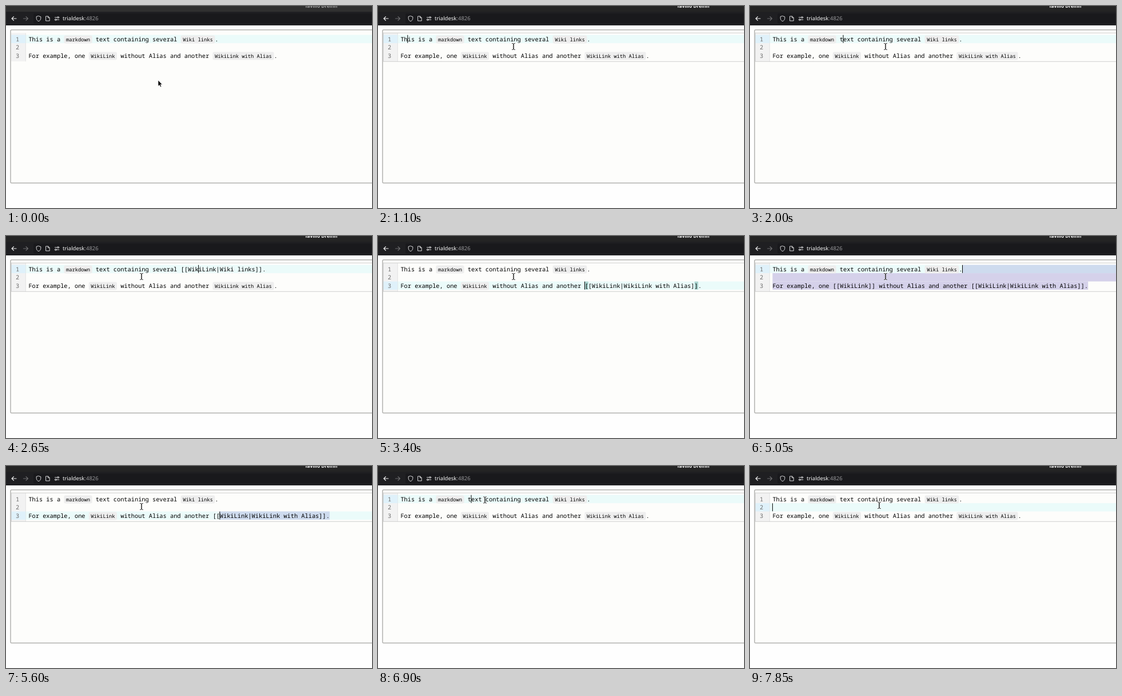
Write an HTML page that moves like this. It is 640 px wide and 354 px high and loops after 8000 ms.

```html
<!DOCTYPE html>
<html lang="en">
<head>
<meta charset="utf-8">
<title>Wiki link editor</title>
<style>
  html, body { margin: 0; width: 100%; height: 100%; overflow: hidden; background: #fefefe; }
  svg { display: block; width: 640px; height: 354px; }
  text { white-space: pre; text-rendering: geometricPrecision; }
  .mono { font-family: "Noto Sans Mono", "DejaVu Sans Mono", monospace; font-size: 10.335px; }
  .chip { font-size: 8.77px; }
  .ui { font-family: "Noto Sans", "Open Sans", sans-serif; font-size: 9.5px; }
  .title { font-size: 8.3px; font-weight: 700; }
</style>
</head>
<body>
<svg viewBox="0 0 640 354" xmlns="http://www.w3.org/2000/svg">
  <rect id="titleBar" width="640" height="11"/>
  <text id="title" class="ui title" x="551" y="2.6" text-anchor="middle">Tavillo Drelfin</text>
  <rect y="10" width="640" height="24" fill="#1f1f22"/>
  <rect x="48" y="13" width="610" height="18" rx="3" fill="#19191c"/>
  <g fill="none" stroke="#f2f2f2" stroke-width="1.2" stroke-linecap="round" stroke-linejoin="round">
    <path d="M18 22H10.3M13.5 18.6L10.1 22L13.5 25.4"/>
    <path d="M30.5 22H38.2M35 18.6L38.4 22L35 25.4" stroke="#6c6c6f"/>
    <g stroke="#d8d8da" stroke-width="1">
      <path d="M57 17.6L60.8 18.9V21.5C60.8 24 59.3 25.8 57 26.7C54.7 25.8 53.2 24 53.2 21.5V18.9Z"/>
      <path d="M70 18H73.7L76.2 20.5V26H70ZM73.5 18.2V20.7H76"/>
      <path d="M85.5 20H89.5M92.4 20H93M88.5 24H92.8M85.2 24H85.6"/>
      <circle cx="91" cy="20" r="1.3"/><circle cx="87" cy="24" r="1.3"/>
    </g>
  </g>
  <text class="ui" x="99" y="25.4" fill="#f6f6f6">trialdesk<tspan fill="#98989b">:4826</tspan></text>
  <rect x="8" y="41.7" width="660" height="268.6" rx="2" fill="#fdfdfb" stroke="#b2b2b0" stroke-width="1.5"/>
  <rect x="9" y="47.4" width="25" height="49.8" fill="#f2f2f2"/>
  <path d="M34.3 47.4V97.2" stroke="#dedede" stroke-width=".8"/>
  <g id="editor"></g>
  <path id="outline" d="M640 47.2H9.2V97.3H640" fill="none" stroke="#c4c4c4" stroke-width=".8"/>
  <path id="arrow" d="M0 0V10.6L2.4 8.4L4 12L5.8 11.2L4.2 7.7H7.3Z" fill="#000" stroke="#fff" stroke-width=".7"/>
  <g id="beam" fill="none" stroke-linecap="round">
    <path d="M-2.4 -5.6Q0 -5.6 0 -4V4Q0 5.6 -2.4 5.6M2.4 -5.6Q0 -5.6 0 -4V4Q0 5.6 2.4 5.6" stroke="#fff" stroke-opacity=".7" stroke-width="2.2"/>
    <path d="M-2.4 -5.6Q0 -5.6 0 -4V4Q0 5.6 -2.4 5.6M2.4 -5.6Q0 -5.6 0 -4V4Q0 5.6 2.4 5.6" stroke="#222" stroke-width="1"/>
  </g>
</svg>
<script>
const LOOP = 8000, TICK = 50, FOCUS_AT = 550, BLINK = 300;
const LEFT = 39.4, TOP = 50.6, ROW = 14.5, CHAR = 6.2, CHIP_CHAR = 5.262, CHIP_PAD = 3.55;
const $ = id => document.getElementById(id);

const lines = [
  'This is a [[markdown]] text containing several [[WikiLink|Wiki links]].',
  '',
  'For example, one [[WikiLink]] without Alias and another [[WikiLink|WikiLink with Alias]].'
].map(source => {
  const parts = [];
  let col = 0;
  for (const text of source.split(/(\[\[.*?\]\])/)) {
    if (!text) continue;
    const label = text.startsWith('[[') ? text.slice(2, -2).split('|').pop() : null;
    parts.push({ text, label, from: col, to: col += text.length });
  }
  return { parts, length: col };
});
const DOC_END = { line: 2, col: lines[2].length };

// Caret positions over time; walk() repeats a key from one column to another.
const caretMoves = [];
const move = (time, line, col) => caretMoves.push({ time, line, col });
function walk(start, end, line, from, to) {
  for (let t = start; t <= end; t += TICK)
    move(t, line, Math.round(from + (to - from) * (t - start) / (end - start)));
}
move(0, 0, 0);
move(FOCUS_AT, 1, 0);
move(750, 0, 0);
move(950, 0, 1);
move(1100, 0, 2);
walk(1250, 1600, 0, 3, 10);
walk(1850, 2000, 0, 11, 24);
walk(2050, 2400, 0, 27, 51);
move(2650, 0, 52);
walk(2900, 3050, 0, 53, 56);
move(3150, 1, 0);
move(3400, 2, 56);
move(3500, 1, 0);
move(3600, 0, 70);
move(3700, 0, 0);
move(4200, 1, 0);
move(4400, 2, 0);
move(4450, 2, 88);
move(4500, 2, 89);
move(4950, 1, 0);
move(5050, 0, 71);
walk(5150, 5200, 0, 70, 69);
walk(5350, 5450, 0, 66, 58);
move(5500, 1, 0);
move(5600, 2, 58);
move(6450, 0, 22);
move(6900, 0, 24);
move(7450, 2, 29);
move(7850, 1, 0);

const SELECT_FROM = 4950, SELECT_TO = 6450;

const pointerPath = [
  [50, 266, 130], [500, 237, 71], [5600, 237, 71], [6250, 137, 63], [6550, 137, 63],
  [6850, 187, 59.5], [7000, 187, 59.5], [7250, 175, 87.5], [7450, 175, 87.5], [7800, 226, 69], [LOOP, 226, 69]
];
function pointerAt(t) {
  const i = pointerPath.findIndex(p => p[0] > t);
  if (i === 0) return pointerPath[0].slice(1);
  const [t0, x0, y0] = pointerPath[i - 1], [t1, x1, y1] = pointerPath[i];
  const u = (t - t0) / (t1 - t0), k = u * u * (3 - 2 * u);
  return [x0 + (x1 - x0) * k, y0 + (y1 - y0) * k];
}

const rowTop = line => TOP + line * ROW;
const rect = (x, y, w, h, fill, rx = 0) =>
  `<rect x="${x}" y="${y}" width="${w}" height="${h}" rx="${rx}" fill="${fill}"/>`;
const label = (x, line, text, cls = '', extra = '') =>
  `<text class="mono ${cls}" x="${x}" y="${rowTop(line) + 11.3}" ${extra}>${text}</text>`;
const before = (a, b) => a.line < b.line || (a.line === b.line && a.col <= b.col);

function layout(from, to) {
  return lines.map(({ parts }, line) => {
    let x = LEFT;
    return parts.map(part => {
      const touched = before(from, { line, col: part.to }) && before({ line, col: part.from }, to);
      const chip = part.label && !touched;
      const width = chip ? part.label.length * CHIP_CHAR + 2 * CHIP_PAD : part.text.length * CHAR;
      const placed = { ...part, chip, x, width };
      x += width;
      return placed;
    });
  });
}

function columnX(parts, col) {
  const part = parts.find(p => col <= p.to);
  if (!part) return LEFT;
  return col === part.to ? part.x + part.width : part.x + (col - part.from) * CHAR;
}

function matchedBrackets(parts, col) {
  for (const i of [col - 1, col]) {
    const link = parts.find(p => p.label && !p.chip && i >= p.from && i < p.to);
    if (!link) continue;
    const inset = Math.min(i - link.from, link.to - 1 - i);
    if (inset < 2) return [link.from + inset, link.to - 1 - inset];
  }
  return [];
}

function editorMarkup(t) {
  const focused = t >= FOCUS_AT;
  const head = caretMoves.filter(m => m.time <= t).pop();
  const selecting = t >= SELECT_FROM && t < SELECT_TO;
  const tail = selecting ? DOC_END : head;
  // Without focus no link is under the caret.
  const placed = layout(head, tail);
  const caretX = columnX(placed[head.line], head.col);
  let out = '';

  if (selecting) {
    for (let line = head.line; line <= tail.line; line++) {
      const x0 = line === head.line ? caretX : LEFT;
      const x1 = line === tail.line ? columnX(placed[line], tail.col) : 640;
      out += rect(x0, rowTop(line), x1 - x0, ROW, '#d5d1ea');
    }
  }

  out += rect(9, rowTop(head.line), 25, ROW, '#dff1fa');
  out += rect(34.5, rowTop(head.line), 606, ROW, 'rgba(184,244,246,.27)');

  if (!selecting && focused) {
    for (const col of matchedBrackets(placed[head.line], head.col))
      out += rect(columnX(placed[head.line], col), rowTop(head.line) + .2, CHAR, 14, 'rgba(50,140,130,.36)');
  }

  placed.forEach((parts, line) => {
    out += label(20, line, line + 1, '', 'fill="#6c6c6c" text-anchor="middle"');
    for (const p of parts) {
      if (p.chip) {
        out += rect(p.x, rowTop(line) + .8, p.width, 14, '#eeeeee', 2.5);
        out += label(p.x + CHIP_PAD, line, p.label, 'chip');
      } else {
        out += label(p.x, line, p.text);
      }
    }
  });

  if (focused && Math.floor((t - head.time) / BLINK) % 2 === 0)
    out += rect(caretX - .5, rowTop(head.line) + .2, 1, 14, '#000');
  return out;
}

function render(t) {
  const focused = t >= FOCUS_AT;
  $('titleBar').setAttribute('fill', focused ? '#242424' : '#303030');
  $('title').setAttribute('fill', focused ? '#ffffff' : '#a4a4a4');
  $('outline').style.display = focused ? '' : 'none';
  $('editor').innerHTML = editorMarkup(t);

  const [x, y] = pointerAt(t), overText = y < 97;
  for (const [id, shown] of [['arrow', !overText], ['beam', overText]]) {
    $(id).style.display = shown ? '' : 'none';
    $(id).setAttribute('transform', `translate(${x} ${y})`);
  }
}

const start = performance.now();
let shown = -1;
function tick() {
  const t = Math.floor((performance.now() - start) % LOOP / TICK) * TICK;
  if (t !== shown) render(shown = t);
  requestAnimationFrame(tick);
}
tick();
</script>
</body>
</html>
```
